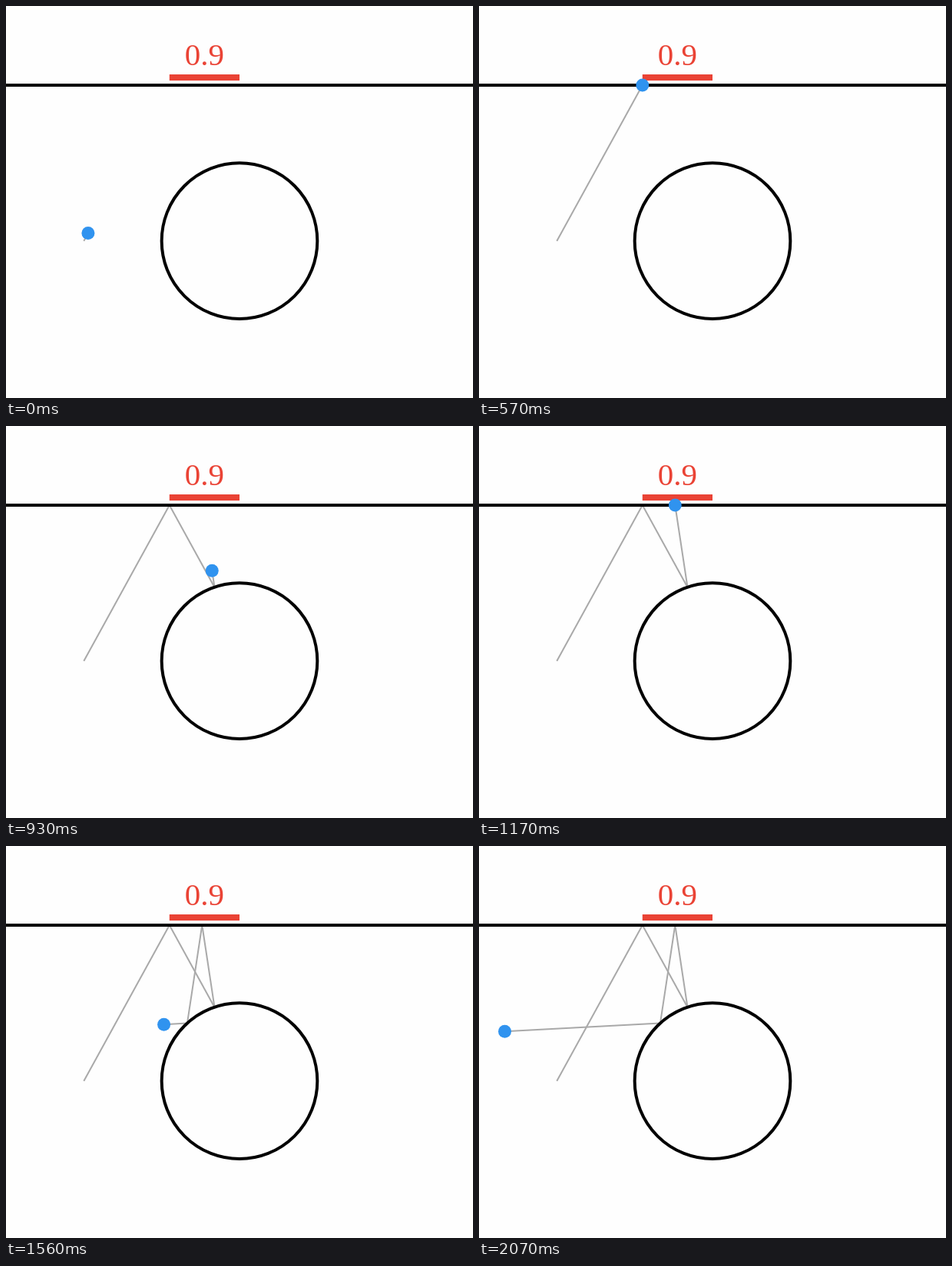
An HTML page with a canvas that plays this animation: 608 by 510 pixels, repeating every 3100 ms.

```html
<!DOCTYPE html>
<html lang="en">
<head>
<meta charset="utf-8">
<title>Bouncing ray</title>
<style>
  html, body { margin: 0; width: 100%; height: 100%; overflow: hidden; background: #fefefe; }
  canvas { display: block; width: 608px; height: 510px; }
</style>
</head>
<body>
<canvas id="stage" width="608" height="510"></canvas>
<script>
const ctx = document.getElementById('stage').getContext('2d');

const LOOP = 3100, STEP = 30, LAST = 70;
const UNIT = 304 / 3, CX = 304, CY = 305.67;
const WALL = 2, OFFSET = 0.9;
// Steps spent on each leg of the path
const LEGS = [20, 10, 10, 10, 20];

const toPx = ([x, y]) => [CX + x * UNIT, CY - y * UNIT];
const along = (p, d, t) => [p[0] + d[0] * t, p[1] + d[1] * t];
const dot = (a, b) => a[0] * b[0] + a[1] * b[1];

function hitCircle(p, d) {
  const a = dot(d, d), b = dot(p, d), c = dot(p, p) - 1;
  return along(p, d, (-b - Math.sqrt(b * b - a * c)) / a);
}

// The unit circle's normal at a point is the point itself
const reflect = (d, n) => along(d, n, -2 * dot(d, n));

function tracePath() {
  const start = [-2, 0], wall1 = [-OFFSET, WALL];
  let d = [wall1[0] - start[0], -WALL];
  const hit1 = hitCircle(wall1, d);
  d = reflect(d, hit1);
  const wall2 = along(hit1, d, (WALL - hit1[1]) / d[1]);
  d = [d[0], -d[1]];
  const hit2 = hitCircle(wall2, d);
  d = reflect(d, hit2);
  const end = along(hit2, d, 2 / Math.hypot(...d));
  return [start, wall1, hit1, wall2, hit2, end].map(toPx);
}

const path = tracePath();

function line(a, b, color, width) {
  ctx.strokeStyle = color;
  ctx.lineWidth = width;
  ctx.beginPath();
  ctx.moveTo(...a);
  ctx.lineTo(...b);
  ctx.stroke();
}

function drawTrail(step) {
  let tip = path[0];
  LEGS.forEach((steps, i) => {
    if (step <= 0) return;
    const k = Math.min(1, step / steps);
    const [a, b] = [path[i], path[i + 1]];
    tip = [a[0] + (b[0] - a[0]) * k, a[1] + (b[1] - a[1]) * k];
    line(a, tip, '#a9a9a9', 2);
    step -= steps;
  });
  return tip;
}

function draw(time) {
  const step = Math.min(LAST, Math.floor(time / STEP) + 1);
  ctx.fillStyle = '#fefefe';
  ctx.fillRect(0, 0, 608, 510);

  const tip = drawTrail(step);

  const wallY = CY - WALL * UNIT;
  line([0, wallY], [608, wallY], '#000', 4);
  ctx.beginPath();
  ctx.arc(CX, CY, UNIT, 0, Math.PI * 2);
  ctx.stroke();

  const left = CX - OFFSET * UNIT;
  line([left, 93], [CX, 93], '#ea4335', 8);
  ctx.fillStyle = '#ea4335';
  ctx.font = '41px "Liberation Serif", "Times New Roman", serif';
  ctx.textAlign = 'center';
  ctx.fillText(OFFSET.toFixed(1), (left + CX) / 2, 77);

  ctx.fillStyle = '#3093ef';
  ctx.beginPath();
  ctx.arc(tip[0], tip[1], 8.5, 0, Math.PI * 2);
  ctx.fill();
}

let begin;
function tick(now) {
  begin ??= now;
  draw((now - begin) % LOOP);
  requestAnimationFrame(tick);
}
draw(0);
requestAnimationFrame(tick);
</script>
</body>
</html>
```
